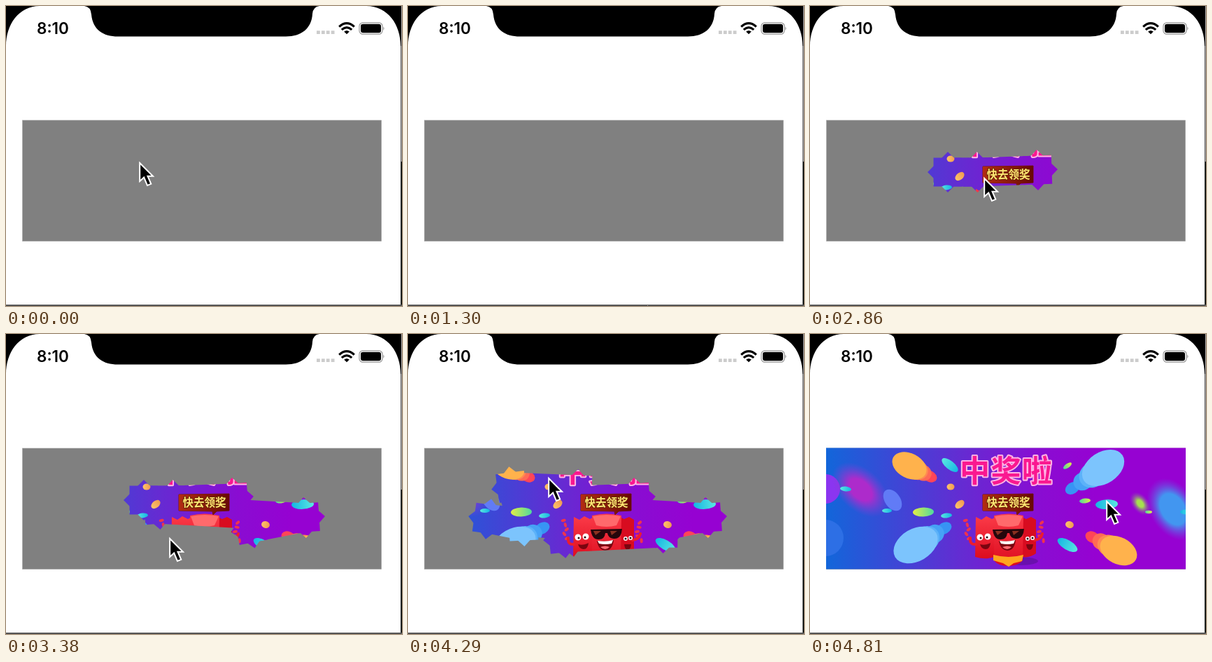
An HTML page for the animation above (4940 ms loop, 566x428 px).

```html
<!DOCTYPE html>
<html lang="zh">
<head>
<meta charset="utf-8">
<title>Scratch card</title>
<style>
  html, body { margin: 0; width: 100%; height: 100%; overflow: hidden; background: #fff; }
  svg { display: block; width: 566px; height: 428px; }
  .clock { font: 600 22.5px Inter, Roboto, sans-serif; }
  .cjk { font-family: "Noto Sans CJK SC", "Noto Sans CJK", sans-serif; font-weight: 900; paint-order: stroke; stroke-linejoin: round; }
</style>
</head>
<body>
<svg viewBox="0 0 566 428">
  <defs>
    <linearGradient id="sky">
      <stop stop-color="#1266da"/>
      <stop offset=".18" stop-color="#3a49d6"/>
      <stop offset=".38" stop-color="#652bd2"/>
      <stop offset=".6" stop-color="#8a0cd2"/>
      <stop offset=".75" stop-color="#9602d2"/>
    </linearGradient>
    <linearGradient id="lime"><stop stop-color="#4fd9a0"/><stop offset="1" stop-color="#e2ee45"/></linearGradient>
    <linearGradient id="aqua"><stop stop-color="#14b6e4"/><stop offset="1" stop-color="#5be8e0"/></linearGradient>
    <linearGradient id="coin"><stop stop-color="#ffc56a"/><stop offset="1" stop-color="#f09a50"/></linearGradient>
    <linearGradient id="red" x2="0" y2="1"><stop stop-color="#fb3a48"/><stop offset="1" stop-color="#dc0c1e"/></linearGradient>
    <linearGradient id="board"><stop stop-color="#b32c12"/><stop offset="1" stop-color="#680806"/></linearGradient>
    <radialGradient id="haze"><stop offset=".4" stop-color="#ad2bcb"/><stop offset="1" stop-color="#8040d8" stop-opacity="0"/></radialGradient>
    <radialGradient id="mist"><stop offset=".5" stop-color="#4296f0"/><stop offset="1" stop-color="#6a50e0" stop-opacity="0"/></radialGradient>
    <radialGradient id="glow"><stop offset=".3" stop-color="#a6e04e"/><stop offset="1" stop-color="#8050b0" stop-opacity="0"/></radialGradient>
    <clipPath id="card"><rect x="23" y="162.500" width="514" height="173"/></clipPath>
    <marker id="star" markerUnits="userSpaceOnUse" orient="auto" overflow="visible">
      <path id="square" fill="#fff" d="M-20.500-20.500h41v41h-41z"/>
      <use href="#square" transform="rotate(45)"/>
    </marker>
    <mask id="rubbed" maskUnits="userSpaceOnUse" x="0" y="0" width="566" height="428">
      <polyline id="trail" fill="none" stroke="#fff" stroke-width="41" stroke-linejoin="bevel"
        marker-start="url(#star)" marker-mid="url(#star)" marker-end="url(#star)"/>
      <rect id="whole" width="566" height="428" fill="#fff"/>
    </mask>
  </defs>

  <rect width="566" height="428"/>
  <path fill="#fff" d="M0 428V57C0 27 18 0 48 0H112Q121 1 122 12C124 34 139 43.500 160 43.500H400C422 43.500 437 32 438 11Q439 1 448 0H515C546 0 564 27 564 57V428Z"/>
  <path fill="#b8b4b2" d="M565 0h1v222h-1z"/>
  <path fill="#484848" d="M564 57h1v165h-1z"/>
  <path fill="#1b1d1b" d="M564 222h2v206h-2z"/>
  <path fill="#555" d="M0 426h566v2H0z"/>

  <text class="clock" x="44" y="40">8:10</text>
  <path stroke="#ccc" stroke-width="4.600" stroke-dasharray="4.800 2.100" d="M444 37.600h25.600"/>
  <path fill="none" stroke="#000" stroke-width="3.200" d="M476.200 29.600Q487 19.800 497.800 29.600M479.800 33.900Q487 27.400 494.200 33.900"/>
  <path d="M487 40.200l-3.800-3.700q3.800-3.200 7.600 0z"/>
  <rect x="505" y="23.800" width="33" height="16.400" rx="5" fill="none" stroke="#999" stroke-width="1.300"/>
  <rect x="507" y="25.800" width="29" height="12.400" rx="3.200"/>
  <path fill="#999" d="M539.300 29.500q2.600 2.500 0 5.200z"/>

  <rect x="23.500" y="163" width="513" height="172.500" fill="#808080" stroke="#a4a4a4" stroke-width=".6"/>

  <g mask="url(#rubbed)"><g clip-path="url(#card)">
    <rect x="23" y="162" width="514" height="174" fill="url(#sky)"/>
    <circle cx="22" cy="221" r="21" fill="#8b35f0"/>
    <circle cx="22" cy="291" r="26" fill="#2d6fe5"/>
    <ellipse rx="48" ry="30" fill="url(#haze)" transform="translate(72 222) rotate(42)"/>
    <ellipse rx="33" ry="48" fill="url(#mist)" transform="translate(519 250) rotate(-32)"/>
    <ellipse rx="19" ry="12" fill="url(#glow)" transform="translate(472 242) rotate(52)"/>
    <ellipse rx="11" ry="17" fill="#617bf6" transform="translate(118 237) rotate(-35)"/>
    <g id="confetti"></g>

    <ellipse cx="300" cy="324" rx="26" ry="6" fill="#50108c" opacity=".5"/>
    <g id="mascots">
      <path fill="url(#red)" d="M237 261l8 4 7-5 8 4 6-3 1 56q-15 6-31 1z"/>
      <path fill="#d80c20" d="M300 260l9 4 7-3 7 4v48q-9 7-20 5z"/>
      <path fill="url(#red)" d="M263 259q21-5 42 0l-1 64q-7 8-21 8t-20-8z"/>
      <path fill="#ff6a6c" d="M264 260q20-4 40 0l-6 13q-14 4-29 0z"/>
      <path fill="#ffa51e" d="M262 315q22 6 43 0l-2 9-12 3-7 5-8-5-14-4z"/>
      <path fill="none" stroke="#ec1d2e" stroke-width="4" stroke-linecap="round" d="M237 300q-9 1-8-9M321 294q9-1 11-9"/>
      <path stroke="#fff" stroke-width="9" stroke-linecap="round" d="M243 290h0M254 289h0"/>
      <path stroke="#fff" stroke-width="6" stroke-linecap="round" d="M311 292h0M318 291h0"/>
      <path stroke="#26070c" stroke-width="3" stroke-linecap="round" d="M244 291h0M253 290h0M311 292h0M318 291h0"/>
      <path fill="#26070c" d="M261 279l45-1-1 6q-3 9-11 8-8-1-9-8h-3q-1 9-9 9-8 1-11-9z"/>
      <path fill="#7a0510" d="M243 300q8 2 15-2-1 9-7 9t-8-7zM309 300h10q-1 8-5 8t-5-8zM270 295q14 2 24-1-2 15-12 15-10-1-12-14z"/>
      <path fill="#fff" d="M271 295q12 2 22-1l-2 5q-9 2-18 0z"/>
      <path fill="#ff6a72" d="M275 304q7-3 13 0-6 6-13 0z"/>
      <path fill="#8b3020" d="M265 281h11l-8 6zM289 281h10l-8 6z"/>
    </g>

    <g class="cjk">
      <text x="214" y="211" font-size="43" letter-spacing="1.500" fill="#fa1890" stroke="#ffb4e4" stroke-width="4">中奖啦</text>
      <path fill="url(#board)" stroke="#6e1510" d="M247 229l72-1v24l-18 1-5 5-1-5-48-1z"/>
      <text x="252.500" y="246" font-size="15.500" fill="#ffe873" stroke="#6d2408" stroke-width="2">快去领奖</text>
    </g>
  </g></g>

  <path id="cursor" stroke="#fff" stroke-width="2" d="M1.200 3V29L7.200 23.500 12 35 17.300 32.800 12.500 21.700H20z"/>
</svg>

<script>
const LOOP = 4940, STEP = 130, REVEAL = 4550;
const RUB_START = 2470;
const CENTRE = { x: 280, y: 250 };
const byId = id => document.getElementById(id);
const lerp = (a, b, f) => a + (b - a) * f;
const degrees = (dx, dy) => Math.atan2(dy, dx) * 180 / Math.PI;

function ellipse(x, y, rx, ry, tilt, fill) {
  const node = document.createElementNS("http://www.w3.org/2000/svg", "ellipse");
  const attrs = { rx, ry, fill, transform: `translate(${x} ${y}) rotate(${tilt})` };
  for (const key in attrs) node.setAttribute(key, attrs[key]);
  byId("confetti").append(node);
}

// A drop that swells from a small tail to a wide head.
function drop(tailX, tailY, headX, headY, size, colours) {
  const tilt = degrees(headX - tailX, headY - tailY);
  colours.forEach((colour, i) => {
    const f = i / (colours.length - 1);
    ellipse(lerp(tailX, headX, f), lerp(tailY, headY, f),
      lerp(11, size, f * f), lerp(8, size * .68, f), tilt, colour);
  });
}

// Leaves fly outwards from the middle of the card.
function leaf(x, y, size, fill) {
  ellipse(x, y, size, size * .43, degrees(x - CENTRE.x, y - CENTRE.y), `url(#${fill})`);
}

const warm = ["#ff4558", "#ff6a55", "#ff8a52", "#ffb24c"];
const cool = ["#3794f4", "#46a2f6", "#5cb2f9", "#7cc4fd"];
drop(171, 203, 142, 188, 26, warm);
drop(404, 290, 441, 309, 28, warm);
drop(192, 277, 151, 301, 34, cool);
drop(375, 220, 419, 191, 33, cool);

leaf(200, 187, 14, "aqua");
leaf(195, 259, 8, "aqua");
leaf(424, 243, 16, "aqua");
leaf(368, 301, 16, "aqua");
leaf(51, 221, 8, "aqua");
leaf(110, 252, 7, "aqua");
leaf(537, 254, 8, "aqua");
leaf(162, 254, 15, "lime");
leaf(368, 188, 7, "lime");
leaf(393, 238, 8, "lime");
leaf(484, 254, 5, "lime");
ellipse(201, 218, 5.5, 4.5, 0, "url(#coin)");
ellipse(214, 243, 7.5, 5, -40, "url(#coin)");
ellipse(371, 272, 6, 5, 15, "url(#coin)");

const noise = seed => Math.abs(Math.sin(seed * 127.1) * 437.58) % 1;
for (let i = 0; i < 10; i++) {
  const side = i % 2 ? 1 : -1;
  ellipse(279 + side * (48 + 14 * noise(i + 1)), 266 + 3.2 * i, 3.5, 2, 180 * noise(i + 20), "#f0334c");
}

// One touch per step while rubbing.
const touches = "197,237 239,237 325,234 248,243 218,250 427,262 350,277 233,289 222,291 365,284 115,264 165,274 148,218 242,222 200,203"
  .split(" ").map(pair => pair.split(",").map(Number));

const keys = [
  [390, 190, 221], [910, 261, 279], [1170, 261, 279], [1300, 342, 426.5],
  [1820, 201, 235], [1950, 197, 234], [2340, 197, 234],
  ...touches.map(([x, y], i) => [RUB_START + i * STEP, x, y]),
  [4810, 423, 236]
];

function pointerAt(t) {
  const next = keys.findIndex(key => key[0] >= t);
  if (next < 1) return keys[0].slice(1);
  const [t0, x0, y0] = keys[next - 1], [t1, x1, y1] = keys[next];
  const f = (t - t0) / (t1 - t0);
  return [lerp(x0, x1, f), lerp(y0, y1, f)];
}

function draw(time) {
  const t = Math.floor((time % LOOP) / STEP + 1e-6) * STEP;
  byId("cursor").setAttribute("transform", `translate(${pointerAt(t)})`);

  // The worn area lags one touch behind the pointer.
  const worn = touches.slice(0, Math.max(0, (t - RUB_START) / STEP));
  if (worn.length === 1) worn.push(worn[0]);
  byId("trail").setAttribute("points", worn.join(" "));
  byId("whole").setAttribute("display", t >= REVEAL ? "inline" : "none");
}

const start = performance.now();
function tick() {
  draw(performance.now() - start);
  requestAnimationFrame(tick);
}
tick();
</script>
</body>
</html>
```
